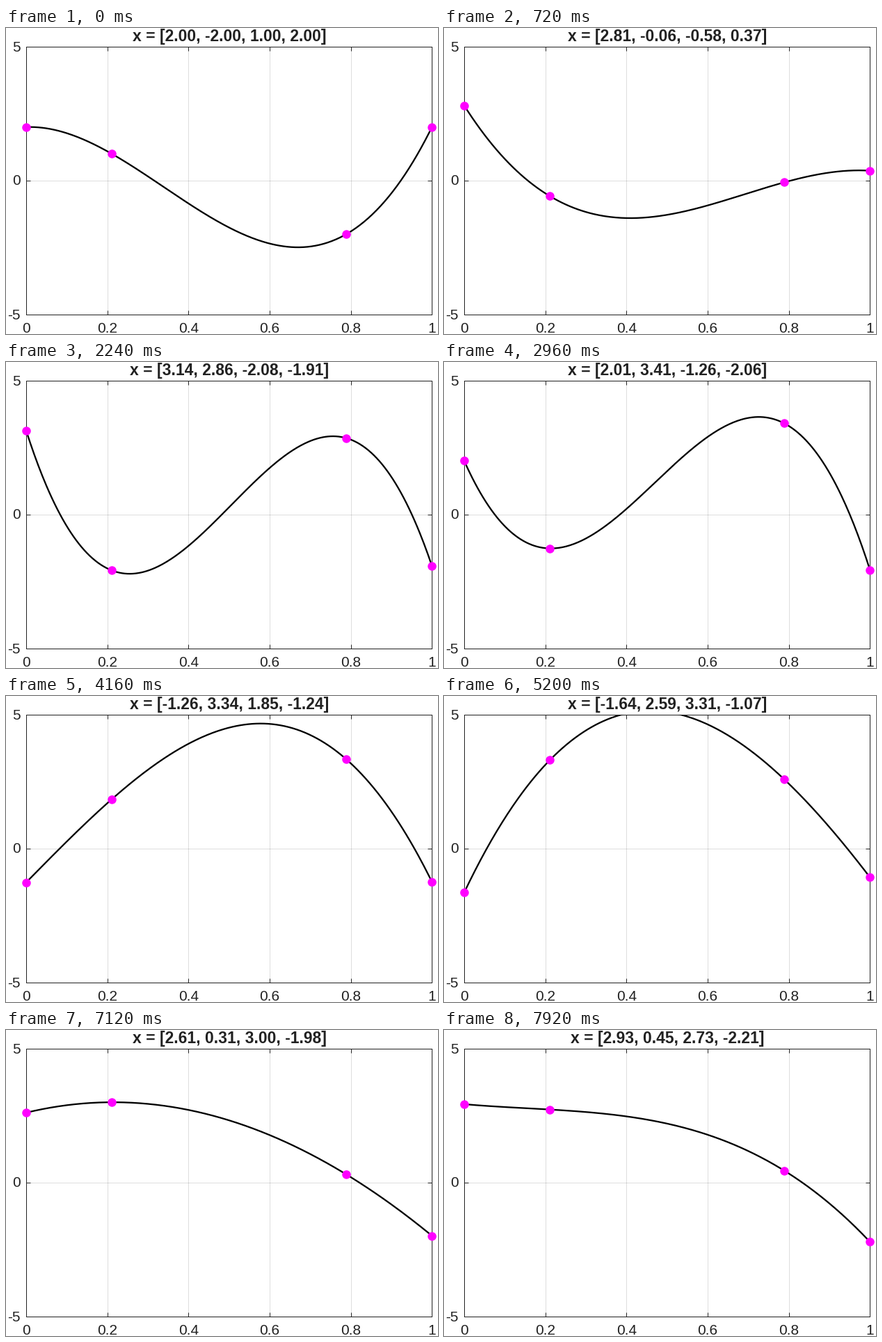
A matplotlib script for the animation above (8 s loop, 621x441 px).

```python
import numpy as np
import matplotlib.pyplot as plt
from matplotlib.animation import FuncAnimation

W, H = 621, 441
LEFT, RIGHT, TOP, BOTTOM = 29, 612.3, 27, 413
FRAMES, INTERVAL = 100, 80
INK = "#212121"
FONT = "Liberation Sans"

# Node positions: both ends and the two Gauss points of [0, 1]
GAUSS = 0.5 / np.sqrt(3)
NODES = np.array([0, 0.5 + GAUSS, 0.5 - GAUSS, 1])

# Key poses: the step and the height of each node
POSES = {
    0: (2, -2, 1, 2),
    19: (3.33, 1.76, -1.83, -1.12),
    37: (2.01, 3.41, -1.26, -2.06),
    52: (-1.26, 3.34, 1.85, -1.24),
    65: (-1.64, 2.59, 3.31, -1.07),
    80: (1.54, 0.71, 3.25, -1.68),
    99: (2.93, 0.45, 2.73, -2.21),
}


def glide(poses, t):
    """Natural cubic spline through all poses, evaluated at the steps t."""
    x = np.array(list(poses), float)
    y = np.array(list(poses.values()), float)
    h = np.diff(x)
    slope = np.diff(y, axis=0) / h[:, None]
    system, rhs = np.eye(len(x)), np.zeros_like(y)
    for i in range(1, len(x) - 1):
        system[i, i - 1:i + 2] = h[i - 1], 2 * (h[i - 1] + h[i]), h[i]
        rhs[i] = 6 * (slope[i] - slope[i - 1])
    m = np.linalg.solve(system, rhs)
    k = np.clip(np.searchsorted(x, t, side="right") - 1, 0, len(h) - 1)
    span = h[k, None]
    v = (t - x[k])[:, None] / span
    u = 1 - v
    bend = ((u**3 - u) * m[k] + (v**3 - v) * m[k + 1]) * span**2 / 6
    return u * y[k] + v * y[k + 1] + bend


heights = glide(POSES, np.arange(FRAMES))

fig = plt.figure(figsize=(W / 72, H / 72), dpi=72, facecolor="white")
ax = fig.add_axes([LEFT / W, 1 - BOTTOM / H, (RIGHT - LEFT) / W, (BOTTOM - TOP) / H])
x_ticks, y_ticks = np.arange(6) / 5, (-5, 0, 5)
ax.set(xlim=(0, 1), ylim=(-5, 5), xticks=x_ticks, yticks=y_ticks)
ax.set_axisbelow(True)
ax.grid(color=INK, alpha=0.15, linewidth=1)
ax.tick_params(direction="in", length=6, width=1, color=INK, top=True, right=True,
               labelbottom=False, labelleft=False)
for spine in ax.spines.values():
    spine.set(color=INK, linewidth=1)


def label(x, baseline, text, align="center", size=20.83, weight="normal"):
    return fig.text(x / W, 1 - baseline / H, text, ha=align, va="baseline",
                    fontsize=size, color=INK, family=FONT, weight=weight)


for v in x_ticks:
    label(LEFT + v * (RIGHT - LEFT), 439, f"{v:g}")
for v in y_ticks:
    label(20.5, 226.5 - v * 38.6, f"{v}", "right")

title = label(321, 19, "", size=22.92, weight="bold")
grid = np.linspace(0, 1, 301)
curve, = ax.plot([], [], color="black", linewidth=2.3, zorder=3)
dots, = ax.plot([], [], "o", color="magenta", markersize=12.5, markeredgewidth=0,
                clip_on=False, zorder=5)


def update(i):
    values = heights[i]
    cubic = np.polyfit(NODES, values, 3)
    curve.set_data(grid, np.polyval(cubic, grid))
    dots.set_data(NODES, values)
    title.set_text("x = [" + ", ".join(f"{v:.2f}" for v in values) + "]")
    return curve, dots, title


anim = FuncAnimation(fig, update, frames=FRAMES, interval=INTERVAL, repeat=True,
                     repeat_delay=0)
plt.show()
```
